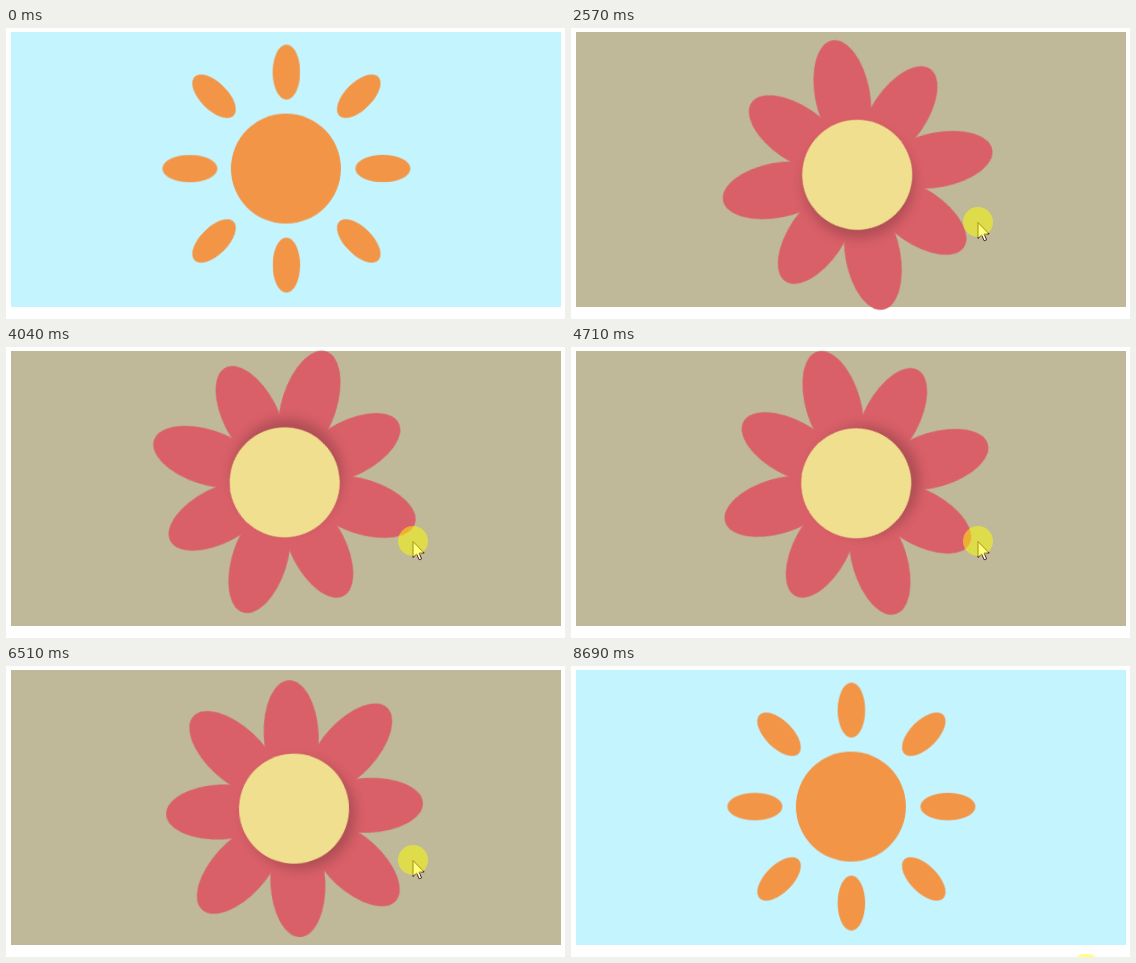
Write an HTML page that moves like this. It is 559x291 px and loops after 8.83 s.

```html
<!DOCTYPE html>
<html lang="en">
<head>
<meta charset="utf-8">
<title>Sun to flower</title>
<style>
  :root {
    --loop: 8830ms;
    --sun: #f29546;
    --petal: #d95f68;
    --heart: #f0df8e;
    --day: #c4f5ff;
    --earth: #bfb999;
  }
  html, body {
    margin: 0;
    width: 100%;
    height: 100%;
    overflow: hidden;
    background: #fff;
  }
  .stage {
    position: relative;
    width: 559px;
    height: 291px;
    overflow: hidden;
  }
  .stage * { position: absolute; }

  .sky {
    left: 5px; top: 4px;
    width: 550px; height: 275px;
    animation: sky var(--loop) infinite;
  }
  .spin {
    left: 281.1px; top: 142.4px;
    width: 0; height: 0;
    animation: spin var(--loop) infinite;
  }
  .head {
    width: 0; height: 0;
    animation: shift var(--loop) infinite;
  }
  .petal {
    left: -27.5px; top: -55px;
    width: 55px; height: 110px;
    border-radius: 50%;
    animation: grow var(--loop) infinite, petal var(--loop) infinite;
  }
  .disc {
    left: -55px; top: -55px;
    width: 110px; height: 110px;
    border-radius: 50%;
    animation: disc var(--loop) infinite;
  }
  .pointer {
    left: 0; top: 0;
    animation: move var(--loop) infinite, show var(--loop) step-end infinite;
  }
  .pointer svg { left: 0; top: 0; overflow: visible; }
  .glow {
    left: -15px; top: -15px;
    width: 30px; height: 30px;
    border-radius: 50%;
    background: rgba(255, 255, 0, .5);
    animation: glow var(--loop) step-end infinite;
  }

  @keyframes sky {
    0%, 23.44%, 95.13%, 100% { background: var(--day); }
    28%, 83.24% { background: var(--earth); }
  }
  @keyframes petal {
    0%, 23.44%, 95.13%, 100% { background: var(--sun); }
    28%, 83.24% { background: var(--petal); }
  }
  @keyframes disc {
    0%, 23.44%, 95.13%, 100% {
      background: var(--sun);
      box-shadow: 0 0 0 rgba(0, 0, 0, 0);
    }
    28%, 83.24% {
      background: var(--heart);
      box-shadow: 6px 6px 12px rgba(0, 0, 0, .2);
    }
  }
  @keyframes grow {
    0%, 14.5%, 95.13%, 100% {
      transform: rotate(var(--a)) translateY(var(--far)) scale(.5);
    }
    20.95%, 83.24% {
      transform: rotate(var(--a)) translateY(var(--near)) scale(1);
    }
  }
  @keyframes shift {
    0%, 23.44%, 95.13%, 100% { transform: translate(-1.1px, -1.4px); }
    28%, 83.24% { transform: translate(7px, 1px); }
  }
  @keyframes spin {
    0%, 23.44% { transform: rotate(0deg); }
    80.07%, 100% { transform: rotate(360deg); }
  }
  @keyframes move {
    0%, 14.95% { transform: translate(464.5px, 266px); }
    20.95%, 86.6% { transform: translate(407px, 194px); }
    95.13%, 98.4% { transform: translate(515px, 320px); }
    98.41%, 100% { transform: translate(515px, 302.5px); }
  }
  @keyframes show {
    0% { visibility: hidden; }
    14.94%, 100% { visibility: visible; }
  }
  @keyframes glow {
    0% { opacity: 0; }
    15.63%, 100% { opacity: 1; }
  }
</style>
</head>
<body>
<div class="stage">
  <div class="sky"></div>
  <div class="spin"><div class="head" id="head"></div></div>
  <div class="pointer">
    <svg width="13" height="20">
      <path d="M0 .5V16.5L3.6 13 6.2 18.8 8.6 17.8 6.1 12H11.2Z"
            fill="#fff" stroke="#4a2016" stroke-width="1"/>
    </svg>
    <div class="glow"></div>
  </div>
</div>
<script>
  const head = document.getElementById('head');

  function add(name) {
    const el = document.createElement('div');
    el.className = name;
    head.append(el);
    return el;
  }

  for (let i = 0; i < 8; i++) {
    const diagonal = i % 2;
    const { style } = add('petal');
    style.setProperty('--a', i * 45 + 'deg');
    style.setProperty('--far', diagonal ? '-102.3px' : '-96.5px');
    style.setProperty('--near', diagonal ? '-82px' : '-73.5px');
  }
  add('disc');
</script>
</body>
</html>
```
